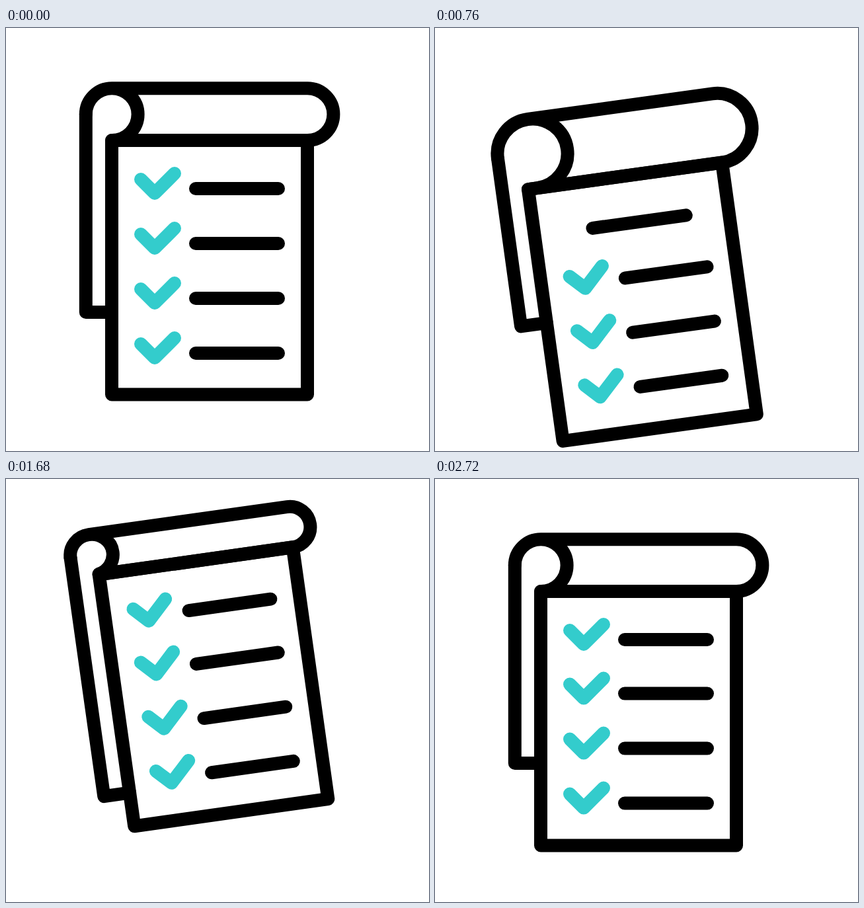
An HTML page for the animation above (3000 ms loop, 640 by 640 pixels).

```html
<!DOCTYPE html>
<html lang="en">
<head>
<meta charset="utf-8">
<title>Checklist</title>
<style>
  html, body { margin: 0; width: 100%; height: 100%; overflow: hidden; background: #fff; }
  svg { display: block; width: 100vw; height: 100vh; }
  #pad path { fill: none; stroke: #000; stroke-width: 20; stroke-linecap: round; stroke-linejoin: round; }
  #pad path.tick { stroke: #33cccc; }
</style>
</head>
<body>
<svg viewBox="0 0 640 640">
  <defs>
    <clipPath id="sheet"><rect x="160" y="170" width="296" height="384.5"/></clipPath>
  </defs>
  <g id="pad">
    <path id="back"/>
    <g clip-path="url(#sheet)"><g id="rows"></g></g>
    <path d="M160 170H456V554.5H160Z"/>
    <path id="roll"/>
  </g>
</svg>
<script>
const LOOP = 3000, STEP = 40;
const KEYS = [120, 885, 1845, 2720];
const LEFT = 160, RIGHT = 456, TOP = 170, R0 = 39.4;
const ROW_Y = 243, PITCH = 83, SCROLL = 81.6;

const $ = id => document.getElementById(id);
const clamp = x => Math.min(1, Math.max(0, x));
const mix = (a, b, p) => a + (b - a) * p;
const smooth = x => x * x * (3 - 2 * x);

// cubic-bezier(.66, 0, .2, 1)
function ease(x) {
  if (x <= 0 || x >= 1) return clamp(x);
  let lo = 0, hi = 1;
  for (let i = 0; i < 30; i++) {
    const u = (lo + hi) / 2, w = 1 - u;
    if (3 * u * w * w * 0.66 + 3 * u * u * w * 0.2 + u * u * u < x) lo = u; else hi = u;
  }
  return smooth(lo);
}

const span = (t, a, b) => clamp((t - a) / (b - a));

// value eased through the four key times
function track(t, values) {
  let i = 0;
  while (i < 2 && t >= KEYS[i + 1]) i++;
  return mix(values[i], values[i + 1], ease(span(t, KEYS[i], KEYS[i + 1])));
}

function addPath(d, cls) {
  const p = document.createElementNS("http://www.w3.org/2000/svg", "path");
  p.setAttribute("d", d);
  if (cls) p.setAttribute("class", cls);
  $("rows").appendChild(p);
  return p;
}

function addRow(y) {
  return {
    tick: addPath(`M204 ${y - 14}L225 ${y + 7}L255 ${y - 23}`, "tick"),
    line: addPath(`M287 ${y}H412`)
  };
}

const show = (el, on) => { el.style.display = on ? "" : "none"; };

const freshY = ROW_Y - SCROLL;
const fresh = addRow(freshY);
fresh.tick.setAttribute("pathLength", 1);
const rows = [0, 1, 2, 3].map(i => addRow(ROW_Y + i * PITCH));

function draw(t) {
  const turn = track(t, [0, -8, -8, 0]);
  const lift = track(t, [0, 51.6, -51.2, 0]);
  const rx = track(t, [R0, 53.3, 31.9, R0]);
  const ry = track(t, [R0, 52.8, 30.5, R0]);
  const tail = TOP + track(t, [260, 203, 336, 260]);
  $("pad").setAttribute("transform", `translate(0 ${lift}) rotate(${turn} 320 320)`);

  const edge = LEFT - R0 + 0.2;
  const cx = edge + rx, cy = TOP - ry;
  $("back").setAttribute("d", `M${LEFT} ${tail}H${edge}V${cy}`);

  const endX = Math.max(LEFT, cx);
  const endY = cy + ry * Math.sqrt(1 - ((endX - cx) / rx) ** 2);
  const arc = `A${rx} ${ry} 0 0 1`;
  $("roll").setAttribute("d",
    `M${edge} ${cy}${arc} ${cx} ${cy - ry}${arc} ${cx + rx} ${cy}${arc} ${endX} ${endY}` +
    `M${cx} ${cy - ry}H${RIGHT}A${ry} ${ry} 0 0 1 ${RIGHT} ${TOP}H${LEFT}`);

  const moved = ease(span(t, KEYS[0], KEYS[1]));
  $("rows").setAttribute("transform", `translate(0 ${SCROLL * moved})`);
  show(rows[3].tick, moved < 0.97);

  const slide = smooth(span(t, 120, 1340));
  fresh.line.setAttribute("d", `M${mix(204, 287, slide)} ${freshY}H${mix(367, 412, slide)}`);

  const drawn = ease(span(t, 820, 1820));
  show(fresh.tick, drawn > 0.001);
  fresh.tick.style.strokeDasharray = drawn < 1 ? `${drawn} 3` : "none";
}

const begin = performance.now();
function frame() {
  const t = (performance.now() - begin) % LOOP;
  draw(Math.floor(t / STEP) * STEP);
  requestAnimationFrame(frame);
}
draw(0);
requestAnimationFrame(frame);
</script>
</body>
</html>
```
